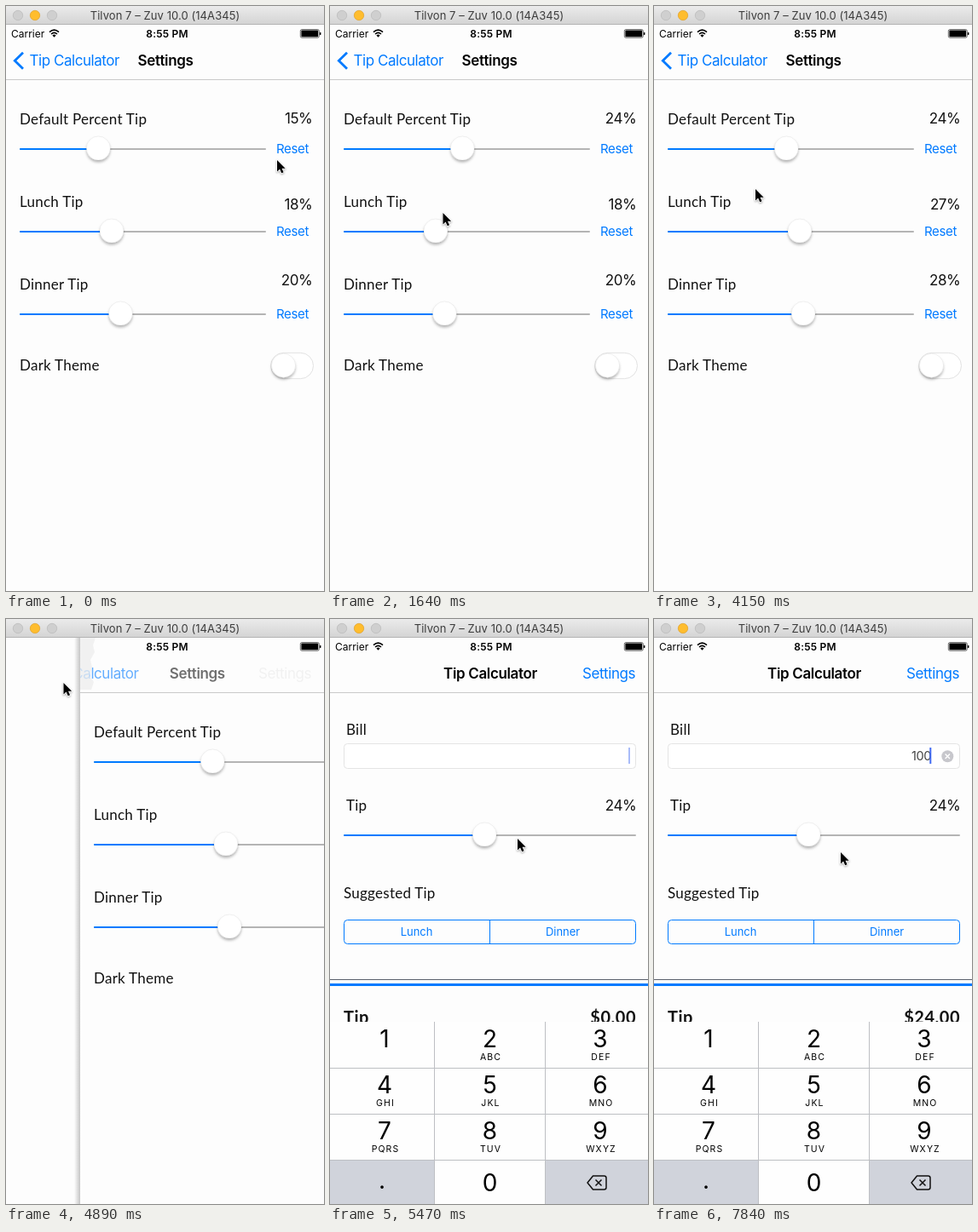
Write an HTML page that moves like this. It is 373 px wide and 687 px high and loops after 7990 ms.

```html
<!DOCTYPE html>
<html lang="en">
<head>
<meta charset="utf-8">
<title>Tip Calculator</title>
<style>
html, body { margin: 0; width: 100%; height: 100%; overflow: hidden; background: #fdfdfd; }
svg { display: block; width: 100vw; height: 100vh; }
text { font-family: Inter, Roboto, sans-serif; fill: #111; white-space: pre; }
.label { font: 17px Lato, "Open Sans", sans-serif; letter-spacing: .25px; }
.total { font: bold 20px Lato, "Open Sans", sans-serif; letter-spacing: .5px; }
.body { font-size: 17px; letter-spacing: -.45px; }
.head { font-size: 17px; font-weight: 600; letter-spacing: -.35px; fill: #000; }
.link { font-size: 15px; letter-spacing: -.3px; }
.small { font-size: 13px; letter-spacing: -.05px; }
.bar { font-size: 12px; fill: #000; }
.digit { font-size: 28px; fill: #000; }
.letters { font-size: 10.5px; letter-spacing: 1.1px; fill: #000; }
.blue { fill: #007aff; }
.mid { text-anchor: middle; }
.end { text-anchor: end; }
</style>
</head>
<body>
<svg id="stage" viewBox="0 0 373 687" preserveAspectRatio="none"></svg>
<script>
const LOOP = 7990, TICK = 148, LAST = 53, W = 373;
const BLUE = '#007aff', PAPER = '#fdfdfd';

// Keys are [tick, value, ...]
const cursorKeys = [
  [0, 318, 181], [1, 331, 175], [2, 331, 175], [3, 205, 172], [4, 108, 169], [8, 154, 169],
  [9, 154, 169], [10, 147, 205], [11, 132.5, 243], [12, 122, 261], [15, 170, 261],
  [17, 170, 261], [18, 163, 290], [20, 130, 349], [21, 126.5, 354], [24, 167, 354],
  [25, 167, 354], [26, 160, 325], [30, 78, 105], [31, 67.5, 75], [34, 67.5, 75],
  [35, 110, 130], [37, 220, 258], [41, 141, 361], [42, 134, 361], [43, 137, 354],
  [47, 221, 277], [48, 221, 277], [49, 219, 274]
];
const sliders = [
  { name: 'Default Percent Tip', y: 168, valueY: 138, keys: [[4, 15], [8, 24]] },
  { name: 'Lunch Tip', y: 265, valueY: 238.5, keys: [[12, 18], [15, 27]] },
  { name: 'Dinner Tip', y: 362, valueY: 328, keys: [[21, 20], [24, 27.8]] }
];
const popKeys = [[32, 0], [33, 87 / W], [34, .86], [35, 1]];
const homeFade = [[33, 0], [34, .5], [35, 1]];
const keypadKeys = [[34, 214], [35, 70], [36, 0]];
const blink = [.9, .45, 0, 0, .5, 1, 1];

function at(keys, k) {
  if (k <= keys[0][0]) return keys[0].slice(1);
  for (let i = 1; i < keys.length; i++) {
    const a = keys[i - 1], b = keys[i];
    if (k <= b[0]) {
      const u = (k - a[0]) / (b[0] - a[0]);
      return a.slice(1).map((v, j) => v + (b[j + 1] - v) * u);
    }
  }
  return keys[keys.length - 1].slice(1);
}

const text = (x, y, cls, str, extra = '') => `<text x="${x}" y="${y}" class="${cls}" ${extra}>${str}</text>`;
const rect = (x, y, w, h, fill, extra = '') =>
  `<rect x="${x}" y="${y}" width="${w}" height="${h}" fill="${fill}" ${extra}/>`;
const path = (d, stroke, width, extra = '') =>
  `<path d="${d}" fill="none" stroke="${stroke}" stroke-width="${width}" ${extra}/>`;
const group = (id, inner, extra = '') => `<g id="${id}" ${extra}>${inner}</g>`;
const knob = (x, y) =>
  `<circle cx="${x}" cy="${y}" r="14" fill="#fff" stroke="#000" stroke-opacity=".1" stroke-width=".6" filter="url(#soft)"/>`;

function slider(y, right, percent) {
  const x = 30 + (right - 44) * percent / 50;
  return rect(16, y - 1, right - 16, 2, '#b4b4b4', 'rx="1"') +
    rect(16, y - 1, x - 16, 2, BLUE, 'rx="1"') + knob(x, y - 1);
}

const defs = `<defs>
  <linearGradient id="chrome" x2="0" y2="1"><stop stop-color="#ebebeb"/><stop offset="1" stop-color="#d3d3d3"/></linearGradient>
  <linearGradient id="edge"><stop stop-color="#000" stop-opacity="0"/><stop offset="1" stop-color="#000" stop-opacity=".22"/></linearGradient>
  <filter id="soft" x="-30%" y="-30%" width="160%" height="170%">
    <feDropShadow dx="0" dy="2.5" stdDeviation="1.6" flood-color="#000" flood-opacity=".28"/></filter>
</defs>`;

const windowBar = rect(0, 0, W, 22, 'url(#chrome)') + rect(0, 21, W, 1, '#b3b3b3') +
  [['#cfcfcf', '#b9b9b9'], ['#ffbd2e', '#e0a028'], ['#cfcfcf', '#b9b9b9']].map(([fill, line], i) =>
    `<circle cx="${14 + 20 * i}" cy="11" r="5.7" fill="${fill}" stroke="${line}" stroke-width=".7"/>`).join('') +
  text(186.5, 16, 'small mid', 'Tilvon 7 – Zuv 10.0 (14A345)', 'style="fill:#3c3c3c;letter-spacing:.07px"');

const carrier = text(6, 36.5, 'bar', 'Carrier') +
  path('M51 30.6Q56.5 25.6 62 30.6M53 33Q56.5 29.8 60 33', '#000', 1.6) +
  '<path d="M54.4 34.4Q56.5 32.6 58.6 34.4L56.5 36.8Z"/>';
const clock = text(189, 36.5, 'bar mid', '8:55 PM', 'style="font-weight:600;letter-spacing:.2px"') +
  rect(345.3, 27.6, 22, 9.6, 'none', 'rx="1.8" stroke="#000" stroke-width=".6"') +
  rect(346.4, 28.6, 19.8, 7.6, '#000', 'rx=".8"') + rect(368, 30.7, 1.4, 3.4, '#000', 'rx=".7"');

const navBar = rect(0, 22, W, 64, PAPER) + rect(0, 86, W, 1, '#c9c9c9') +
  path('M20 54.8L10.3 64.3L20 73.8', BLUE, 2.8, 'id="chevron"') +
  text(27.5, 70, 'body blue', 'Tip Calculator', 'id="backText"') +
  text(187, 70, 'head mid', 'Settings', 'id="title"') +
  text(188, 70, 'head mid', 'Tip Calculator', 'id="homeTitle"') +
  text(358, 70, 'body blue end', 'Settings', 'id="homeLink"');

const toggle = rect(310.5, 407.3, 50, 30.4, '#fff', 'rx="15.2" stroke="#e2e2e2"') + knob(325.5, 422.2);
const settings = rect(-7, 22, 7, 665, 'url(#edge)') + rect(0, 22, W, 665, PAPER) +
  sliders.map((s, i) => text(16, s.y - 29, 'label', s.name) +
    text(359.3, s.valueY, 'body end', '', `id="value${i}"`) + group('slider' + i, '') +
    text(336, s.y + 5, 'link blue mid', 'Reset')).join('') +
  text(16, 428.3, 'label', 'Dark Theme') + toggle;

const segments = rect(16.5, 353.5, 342, 28, 'none', `rx="4" stroke="${BLUE}"`) + rect(187, 353, 1, 29, BLUE) +
  text(101.5, 372, 'small blue mid', 'Lunch') + text(273, 372, 'small blue mid', 'Dinner');
const clearMark = group('clear', '<circle cx="344.3" cy="161.3" r="7" fill="#c7c7cc"/>' +
  path('M341.6 158.6l5.4 5.4m0-5.4l-5.4 5.4', '#fff', 1.4));
const home = text(19, 136, 'label', 'Bill') +
  rect(16.5, 146.5, 342, 29, '#fff', 'rx="4" stroke="#e4e4e4"') +
  text(325, 166, 'end', '', 'id="bill" style="font-size:14.5px;letter-spacing:-.4px;fill:#444"') +
  rect(0, 151, 2, 19, '#426bf2', 'id="caret"') + clearMark +
  text(19, 225, 'label', 'Tip') + text(359.3, 225, 'body end', '24%') + slider(254, 359, 24) +
  text(16, 327.5, 'label', 'Suggested Tip') + segments +
  rect(0, 423, W, 1, '#59606c') + rect(0, 428, W, 3, BLUE) +
  text(16, 475, 'total', 'Tip') + text(359, 475, 'total end', '', 'id="amount"');

const columns = [64, 187.5, 317];
const letters = ['', 'ABC', 'DEF', 'GHI', 'JKL', 'MNO', 'PQRS', 'TUV', 'WXYZ'];
const keypad = rect(0, 473, W, 214, '#fefefe') +
  rect(0, 635, 122, 52, '#d0d3db') + rect(253, 635, 120, 52, '#d0d3db') +
  [527, 581, 635].map(y => rect(0, y, W, 1, '#bdbfc3')).join('') +
  [122, 252].map(x => rect(x, 473, 1, 214, '#bdbfc3')).join('') +
  letters.map((s, i) => {
    const x = columns[i % 3], y = 503 + 54 * Math.floor(i / 3);
    return text(x, y, 'digit mid', i + 1) + text(x + 1, y + 15, 'letters mid', s);
  }).join('') +
  text(187.5, 672, 'digit mid', '0') + text(61, 669, 'digit mid', '.') +
  path('M308.5 654H321.5Q324 654 324 656.5V667.5Q324 670 321.5 670H308.5L302 662Z', '#111', 1.5, 'stroke-linejoin="round"') +
  path('M311.5 658.5l7 7m0-7l-7 7', '#111', 1.5);

const cover = rect(0, 22, 87, 665, PAPER) + rect(80, 22, 7, 665, 'url(#edge)') +
  '<path d="M87 22H105L102 31L104 39L99 48L101 57L98 67L103 74L100 83H87Z" fill="#eee" opacity=".75"/>';

const arrow = '<path d="M0 0V13.4L3.1 10.6L5.2 15.3L7.6 14.3L5.5 9.7H9.7Z" stroke="#fff" stroke-width="1.6" ' +
  'paint-order="stroke" stroke-linejoin="round" filter="drop-shadow(0 1px 1px #0005)"/>';

document.getElementById('stage').innerHTML = defs + rect(0, 0, W, 687, PAPER) +
  group('home', home) + group('settings', settings) + group('keypad', keypad) +
  navBar + carrier + group('cover', cover) + clock + windowBar + group('cursor', arrow);

const $ = id => document.getElementById(id);
const set = (id, name, value) => $(id).setAttribute(name, value);
const fade = (id, v) => set(id, 'opacity', Math.max(0, Math.min(1, v)));
const move = (id, x, y = 0) => set(id, 'transform', `translate(${x} ${y})`);

function drawNav(p) {
  fade('chevron', p ? (.2 - p) * 5 : 1);
  fade('backText', 1 - p * 1.7);
  move('backText', p * 96);
  fade('title', 1 - p * 1.9);
  move('title', p * 160);
  fade('homeTitle', p * 2 - 1);
  move('homeTitle', (p - 1) * 96);
  fade('homeLink', p < .5 ? p * .25 : p * 2 - 1);
  $('homeLink').style.fill = p < .5 ? '#444' : BLUE;
  fade('cover', p > 0 && p < .5 ? 1 : 0);
}

function drawBill(k) {
  const bill = k >= 53 ? '100' : k >= 51 ? '10' : k >= 50 ? '1' : '';
  $('bill').textContent = bill;
  $('amount').textContent = '$' + (bill * .24).toFixed(2);
  fade('clear', bill ? 1 : 0);
  set('caret', 'x', bill ? 323.3 : 350);
  fade('caret', k < 36 ? 0 : k >= 49 ? 1 : blink[(k - 36) % 7]);
}

function draw(t) {
  const k = Math.min(LAST, Math.floor((t + 10) / TICK));
  const [p] = at(popKeys, k);
  sliders.forEach((s, i) => {
    const [v] = at(s.keys, k);
    $('value' + i).textContent = Math.round(v) + '%';
    $('slider' + i).innerHTML = slider(s.y, 305, v);
  });
  move('settings', p * W);
  set('settings', 'visibility', p < 1 ? 'visible' : 'hidden');
  move('home', (p - 1) * 112);
  fade('home', at(homeFade, k)[0]);
  move('keypad', 0, at(keypadKeys, k)[0]);
  drawNav(p);
  drawBill(k);
  move('cursor', ...at(cursorKeys, k));
}

function frame() {
  draw(performance.now() % LOOP);
  requestAnimationFrame(frame);
}
frame();
</script>
</body>
</html>
```
